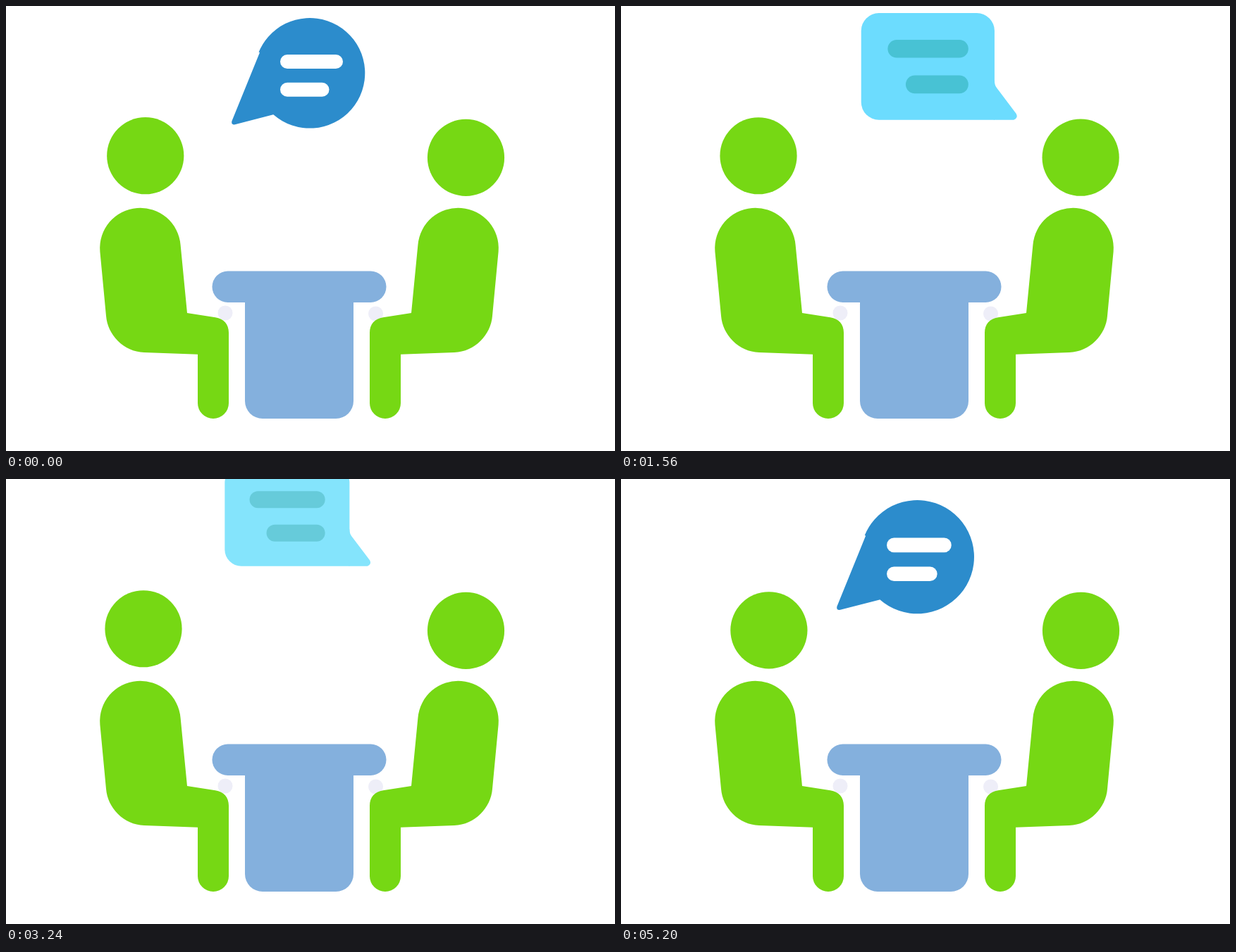
These frames come from a looping animation (864 px wide and 632 px high, 5220 ms). An HTML page with a canvas:

```html
<!DOCTYPE html>
<html lang="en">
<head>
<meta charset="utf-8">
<title>Conversation</title>
<style>
html, body { margin: 0; width: 100%; height: 100%; overflow: hidden; background: #fff; }
canvas { display: block; width: 864px; height: 632px; }
</style>
</head>
<body>
<canvas id="stage" width="864" height="632"></canvas>
<script>
const ctx = document.getElementById('stage').getContext('2d');
const LOOP = 5220, MID = 416;
const GREEN = '#76d814', TABLE = '#84b0dd', HAND = '#eeeef8';

const clamp = u => Math.max(0, Math.min(1, u));
const smooth = u => { u = clamp(u); return u * u * (3 - 2 * u); };

// One soft swing to 1 and back, centred on a step
function nod(n, center, half) {
  const d = Math.abs(n - center) / half;
  return d < 1 ? Math.cos(d * Math.PI / 2) ** 2 : 0;
}

// Grows past full size, settles back, then shrinks very slowly
function pop(k, rise, over, settle) {
  if (k < rise) return smooth(k / rise) * (1 + over);
  const back = smooth((k - rise) / (settle - rise));
  return 1 + over * (1 - back) - 0.001 * Math.max(0, k - settle);
}

function mix(a, b, u) {
  return `rgb(${a.map((v, i) => Math.round(v + (b[i] - v) * u)).join(',')})`;
}

function disc(x, y, r, color) {
  ctx.fillStyle = color;
  ctx.beginPath();
  ctx.arc(x, y, r, 0, Math.PI * 2);
  ctx.fill();
}

function pill(x, y, w, h, color) {
  ctx.fillStyle = color;
  ctx.beginPath();
  ctx.roundRect(x, y, w, h, h / 2);
  ctx.fill();
}

function body() {
  ctx.fillStyle = GREEN;
  ctx.beginPath();
  ctx.moveTo(133.4, 349);
  ctx.arc(190.5, 344, 57.3, Math.PI - 0.08, -0.08);
  ctx.lineTo(257, 436);
  ctx.lineTo(297, 442.3);
  ctx.bezierCurveTo(309, 444, 316, 452, 316, 464);
  ctx.lineTo(316, 564);
  ctx.arc(294, 564, 22, 0, Math.PI);
  ctx.lineTo(272, 494.8);
  ctx.lineTo(196, 492);
  ctx.bezierCurveTo(167, 491, 144, 467, 142, 440);
  ctx.closePath();
  ctx.fill();
}

function mirrored(draw) {
  ctx.save();
  ctx.translate(MID * 2, 0);
  ctx.scale(-1, 1);
  draw();
  ctx.restore();
}

function table() {
  pill(292.5, 376.5, 247, 44.5, TABLE);
  ctx.beginPath();
  ctx.roundRect(339, 390, 154, 196, [0, 0, 25, 25]);
  ctx.fill();
}

function head(x, restX) {
  disc(x, 212.7 + (x - restX) ** 2 / 80, 54.6, GREEN);
}

// Both bubbles are drawn with the tip of the tail at 0,0
function roundBubble(fade) {
  ctx.fillStyle = mix([44, 140, 204], [136, 136, 136], fade);
  ctx.beginPath();
  ctx.moveTo(40, -100);
  ctx.lineTo(0.4, -2.5);
  ctx.quadraticCurveTo(-0.8, 3.2, 5, 2.3);
  ctx.lineTo(59, -11.7);
  ctx.arc(111, -70.7, 78.3, 2.29, Math.PI + 0.39, true);
  ctx.closePath();
  ctx.fill();
  pill(69, -97, 89, 20, '#fff');
  pill(69, -57.3, 69.5, 20, '#fff');
}

function squareBubble(fade) {
  ctx.fillStyle = mix([108, 220, 254], [115, 236, 240], fade);
  ctx.beginPath();
  ctx.roundRect(-211, -144.7, 181, 145, [24, 24, 0, 24]);
  ctx.fill();
  ctx.beginPath();
  ctx.moveTo(-31, -53);
  ctx.lineTo(-30, -53);
  ctx.quadraticCurveTo(-30, -47, -27, -43);
  ctx.lineTo(-0.5, -8);
  ctx.quadraticCurveTo(2.5, -2, -4, 0.3);
  ctx.lineTo(-31, 0.3);
  ctx.fill();
  const line = mix([72, 194, 212], [80, 190, 208], fade);
  pill(-175, -108.5, 109.5, 24.5, line);
  pill(-150.5, -60, 85, 24.5, line);
}

function bubble(draw, x, y, size, alpha) {
  if (size <= 0 || alpha <= 0) return;
  // A layer of its own keeps parts from showing through each other
  layer.width = 864;
  const main = ctx;
  pen.save();
  pen.translate(x, y);
  pen.scale(size, size);
  withPen(pen, () => draw(1 - alpha));
  pen.restore();
  main.globalAlpha = alpha;
  main.drawImage(layer, 0, 0);
  main.globalAlpha = 1;
}

const layer = Object.assign(document.createElement('canvas'), { width: 864, height: 632 });
const pen = layer.getContext('2d');

// Records the bubble on the layer by lending it the drawing calls
function withPen(target, draw) {
  const calls = ['beginPath', 'moveTo', 'lineTo', 'quadraticCurveTo', 'arc', 'roundRect', 'closePath'];
  const kept = ctx.fill;
  for (const name of calls) ctx[name] = (...args) => target[name](...args);
  ctx.fill = () => { target.fillStyle = ctx.fillStyle; target.fill(); };
  draw();
  for (const name of calls) delete ctx[name];
  delete ctx.fill;
}

function blueBubble(n) {
  if (n < 60) {
    bubble(roundBubble, 320 + 1.386 * n, 166 - 1.545 * n, 1 - 0.0007 * n, clamp(1 - (n - 10) / 14.3));
  } else {
    const k = n - 98;
    bubble(roundBubble, 288 + 1.286 * k, 205.7 - 1.586 * k, pop(n - 83, 19, 0.1, 34.7), 1);
  }
}

function cyanBubble(n) {
  const k = n - 22;
  bubble(squareBubble,
    572.5 - 0.86 * k - 0.0063 * k * k,
    167.5 - 0.381 * k - 0.0112 * k * k,
    pop(n - 17, 18.5, 0.065, 31),
    clamp(1 - (n - 68) / 12));
}

// Three uneven steps (20, 100 and 20 ms) repeat every 140 ms
function stepAt(t) {
  const r = t % 140;
  return Math.floor(t / 140) * 3 + (r < 20 ? 0 : r < 120 ? 1 : 2);
}

function render(now) {
  const n = stepAt(now % LOOP);
  ctx.fillStyle = '#fff';
  ctx.fillRect(0, 0, 864, 632);
  disc(311, 436, 10.5, HAND);
  disc(524.5, 437, 10.5, HAND);
  table();
  body();
  mirrored(body);
  const lean = nod(n, -7, 10.5) + nod(n, 88, 9.5) + nod(n, 111, 18.5);
  head(195 + 15 * lean - 10.5 * nod(n, 8, 10), 197);
  head(652.5 - 15.4 * (nod(n, 22.5, 10) + nod(n, 43, 10)), 638);
  blueBubble(n);
  cyanBubble(n);
}

const start = performance.now();
function tick() {
  render(performance.now() - start);
  requestAnimationFrame(tick);
}
tick();
</script>
</body>
</html>
```
